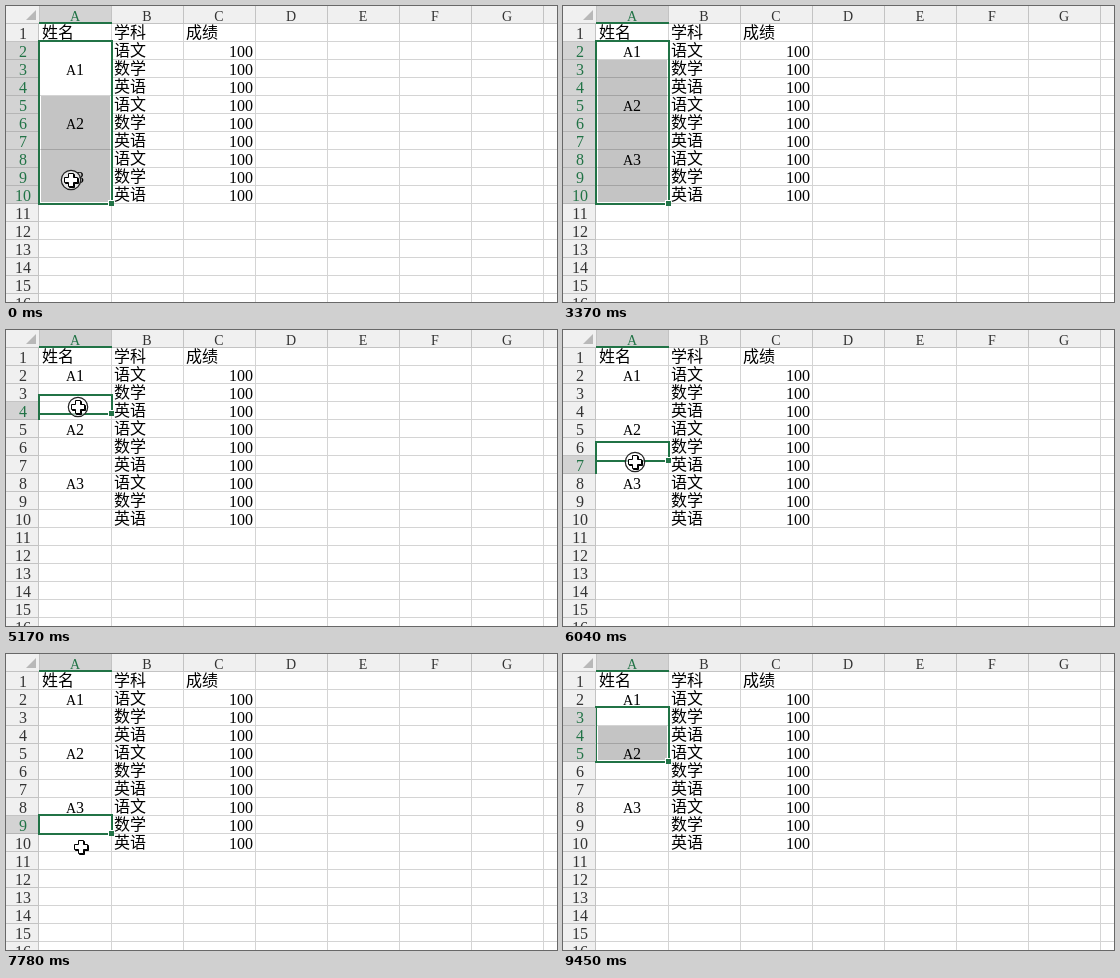
An HTML page for the animation above (9550 ms loop, 551 by 296 pixels).

```html
<!DOCTYPE html>
<html lang="zh">
<head>
<meta charset="utf-8">
<title>Cell selection</title>
<style>
  html, body { margin: 0; width: 100%; height: 100%; overflow: hidden; background: #fff; }
  svg { display: block; width: 551px; height: 296px; }
  text { font: 16px "Liberation Serif", "Noto Sans CJK SC", "Noto Sans CJK", serif; fill: #000; }
  .han { font-family: "Noto Sans CJK SC", "Noto Sans CJK", sans-serif; font-weight: 300; }
  .letter { font-size: 14px; }
  .mid { text-anchor: middle; }
  .end { text-anchor: end; }
  .head text { fill: #333; }
  .head .on { fill: #217346; }
</style>
</head>
<body>
<svg viewBox="0 0 551 296">
  <g id="grid"></g>
  <g id="cells"></g>
  <g id="head" class="head"></g>
  <g id="select"></g>
  <g id="cursor"></g>
</svg>
<script>
const LOOP = 9550, ROW = 18, COL = 72, LEFT = 33, W = 551, H = 296;
const UNMERGE = 3370, THIN_EDGE = 9450;
const GREEN = '#217346', LINE = '#d4d4d4', HEAD = '#f0f0f0', HEAD_ON = '#d3d3d3', HEAD_LINE = '#c3c3c3';

const $ = id => document.getElementById(id);
const rect = (x, y, w, h, fill, more = '') =>
  `<rect x="${x}" y="${y}" width="${w}" height="${h}" fill="${fill}" ${more}/>`;
const text = (x, y, s, cls = '') => `<text x="${x}" y="${y}" class="${cls}">${s}</text>`;
const range = (a, b) => Array.from({ length: b - a + 1 }, (_, i) => a + i);
const lineAbove = row => row * ROW - 1;
const baseline = row => row * ROW + 15;
const colLine = i => LEFT + COL * i;

// time, x, y, shape
const cursorKeys = [
  [0, 65, 174, 'ring'], [150, 285, 88, 'cross'], [270, 501.5, 6, 'down'], [420, 0, 0, ''],
  [4210, 98, 90, 'cross'], [4360, 84, 92, 'cross'], [4480, 71, 59, 'cross'], [4630, 71, 60, 'cross'],
  [4780, 71, 60, 'ring'], [4900, 71, 62, 'cross'], [5050, 72, 73, 'cross'], [5170, 72, 77, 'ring'],
  [5410, 72, 91, 'cross'], [5530, 72, 110, 'cross'], [5680, 72, 114, 'ring'], [5920, 72, 126, 'cross'],
  [6040, 72, 132, 'ring'], [6190, 72, 134, 'cross'], [6310, 73, 160, 'cross'], [6430, 74, 172, 'ring'],
  [6550, 75, 192, 'cross'], [6670, 77, 180, 'cross'], [7070, 110, 198, 'cross'], [7500, 108, 198, 'cross'],
  [7780, 75, 193, 'cross'], [7900, 75, 193, 'ring'], [8050, 76, 150, 'cross'], [8170, 76, 90, 'cross'],
  [8290, 75, 57, 'ring'], [8410, 80, 72, 'ring'], [8560, 86, 98, 'ring'], [8870, 85, 97, 'cross'],
  [9020, 0, 0, '']
];

// time, first row, last row, share of the glide from the previous range
const selectKeys = [
  [0, 2, 10, 1], [4780, 3, 3, .6], [4900, 3, 3, 1], [5170, 4, 4, .67], [5290, 4, 4, 1],
  [5680, 6, 6, .4], [5800, 6, 6, 1], [6040, 7, 7, .25], [6190, 7, 7, 1],
  [6430, 9, 9, .5], [6550, 9, 9, 1], [7900, 10, 10, .6], [8050, 10, 10, 1],
  [8290, 3, 3, .6], [8410, 3, 4, 1], [8560, 3, 5, 1]
];

const indexAt = (keys, t) => {
  let i = keys.length - 1;
  while (keys[i][0] > t) i--;
  return i;
};

function selectionAt(t) {
  const i = indexAt(selectKeys, t);
  const [, first, last, share] = selectKeys[i];
  const [, a, b] = selectKeys[Math.max(0, i - 1)];
  const mix = (from, to) => Math.round(from + (to - from) * share);
  return {
    first, last, still: share === 1,
    top: mix(lineAbove(a), lineAbove(first)),
    bottom: mix(lineAbove(b + 1), lineAbove(last + 1))
  };
}

function drawGrid() {
  const rows = range(1, 16).map(r => rect(LEFT, lineAbove(r + 1), W, 1, LINE));
  const cols = range(1, 7).map(i => rect(colLine(i), ROW, 1, H, LINE));
  $('grid').innerHTML = rect(0, 0, W, H, '#fff') + rows.join('') + cols.join('');
}

function drawCells(t, sel) {
  const merged = t < UNMERGE;
  let out = '';
  if (merged) {
    for (const r of [2, 5, 8]) out += rect(LEFT + 1, r * ROW, COL - 1, 3 * ROW - 1, '#fff');
  }
  const grayFrom = sel.first + (merged ? 3 : 1);
  if (sel.still && sel.last >= grayFrom) {
    const y = grayFrom * ROW;
    out += rect(LEFT + 2, y, COL - 3, sel.bottom - 1 - y, '#000', 'opacity=".23"');
  }
  ['姓名', '学科', '成绩'].forEach((s, i) => out += text(colLine(i) + 3, baseline(1) - 1, s, 'han'));
  for (const r of range(2, 10)) {
    out += text(108, baseline(r) - 1, ['语文', '数学', '英语'][(r - 2) % 3], 'han');
    out += text(247, baseline(r), '100', 'end');
  }
  [1, 2, 3].forEach(n => {
    const y = baseline(3 * n - 1) + (merged ? ROW : 0);
    out += text(69, y, `<tspan class="letter">A</tspan>${n}`, 'mid');
  });
  $('cells').innerHTML = out;
}

function drawHead(sel) {
  let out = rect(0, 0, W, ROW - 1, HEAD) + rect(0, 0, LEFT, H, HEAD);
  out += '<path d="M30 4V14H20Z" fill="#b8b8b8"/>';
  out += rect(LEFT, 0, COL, ROW - 1, HEAD_ON);
  for (const i of range(0, 7)) {
    out += rect(colLine(i), 0, 1, ROW, HEAD_LINE);
    if (i < 7) out += text(colLine(i) + 36, 15, 'ABCDEFG'[i], 'letter mid' + (i ? '' : ' on'));
  }
  out += rect(0, ROW - 1, W, 1, HEAD_LINE) + rect(LEFT - 1, ROW, 1, H, HEAD_LINE);
  for (const r of range(1, 16)) {
    const on = r >= sel.first && r <= sel.last;
    if (on) out += rect(0, r * ROW, LEFT, ROW - 1, HEAD_ON);
    out += rect(0, lineAbove(r + 1), LEFT, 1, on ? '#b5b5b5' : HEAD_LINE);
    if (on) out += rect(LEFT - 1, lineAbove(r), 2, ROW + 1, GREEN);
    out += text(17, baseline(r), r, 'mid' + (on ? ' on' : ''));
  }
  out += rect(LEFT, ROW - 2, COL + 1, 2, GREEN);
  $('head').innerHTML = out;
}

function drawSelection(t, sel) {
  const { top, bottom } = sel, right = LEFT + COL, h = bottom - top + 2;
  const thin = t >= THIN_EDGE ? 1 : 0;
  $('select').innerHTML =
    (thin ? rect(LEFT - 1, top + 1, 1, h - 2, HEAD_LINE) : '') +
    rect(LEFT - 1, top - 1, COL + 3, 2, GREEN) +
    rect(LEFT - 1 + thin, top, 2 - thin, h, GREEN) +
    rect(right, top, 2, h, GREEN) +
    rect(LEFT - 1, bottom, COL + 3, 2, GREEN) +
    rect(right - 3, bottom - 3, 6, 6, '#fff') +
    rect(right - 2, bottom - 2, 5, 5, GREEN);
}

function drawCursor([, x, y, shape]) {
  const cross = 'M-2.5-6.5h5v4h4v5h-4v4h-5v-4h-4v-5h4z';
  const down = 'M-1-5h2v5h2.5L0 5L-3.5 0H-1z';
  let out = '';
  if (shape === 'ring') {
    out += '<circle r="9.7" fill="#fff" fill-opacity=".6" stroke="#222" stroke-width="1.2"/>';
  }
  if (shape === 'down') out += `<path d="${down}"/>`;
  else if (shape) {
    out += `<path d="${cross}" transform="translate(1 1)" stroke="#000"/>`;
    out += `<path d="${cross}" fill="#fff" stroke="#000"/>`;
  }
  $('cursor').setAttribute('transform', `translate(${x} ${y})`);
  $('cursor').innerHTML = out;
}

let shown = '';
function render(now) {
  const t = now % LOOP;
  const c = indexAt(cursorKeys, t);
  const key = [c, indexAt(selectKeys, t), t < UNMERGE, t < THIN_EDGE].join();
  if (key !== shown) {
    shown = key;
    const sel = selectionAt(t);
    drawCells(t, sel);
    drawHead(sel);
    drawSelection(t, sel);
    drawCursor(cursorKeys[c]);
  }
}

drawGrid();
render(0);
const start = performance.now();
(function tick() {
  render(performance.now() - start);
  requestAnimationFrame(tick);
})();
</script>
</body>
</html>
```
